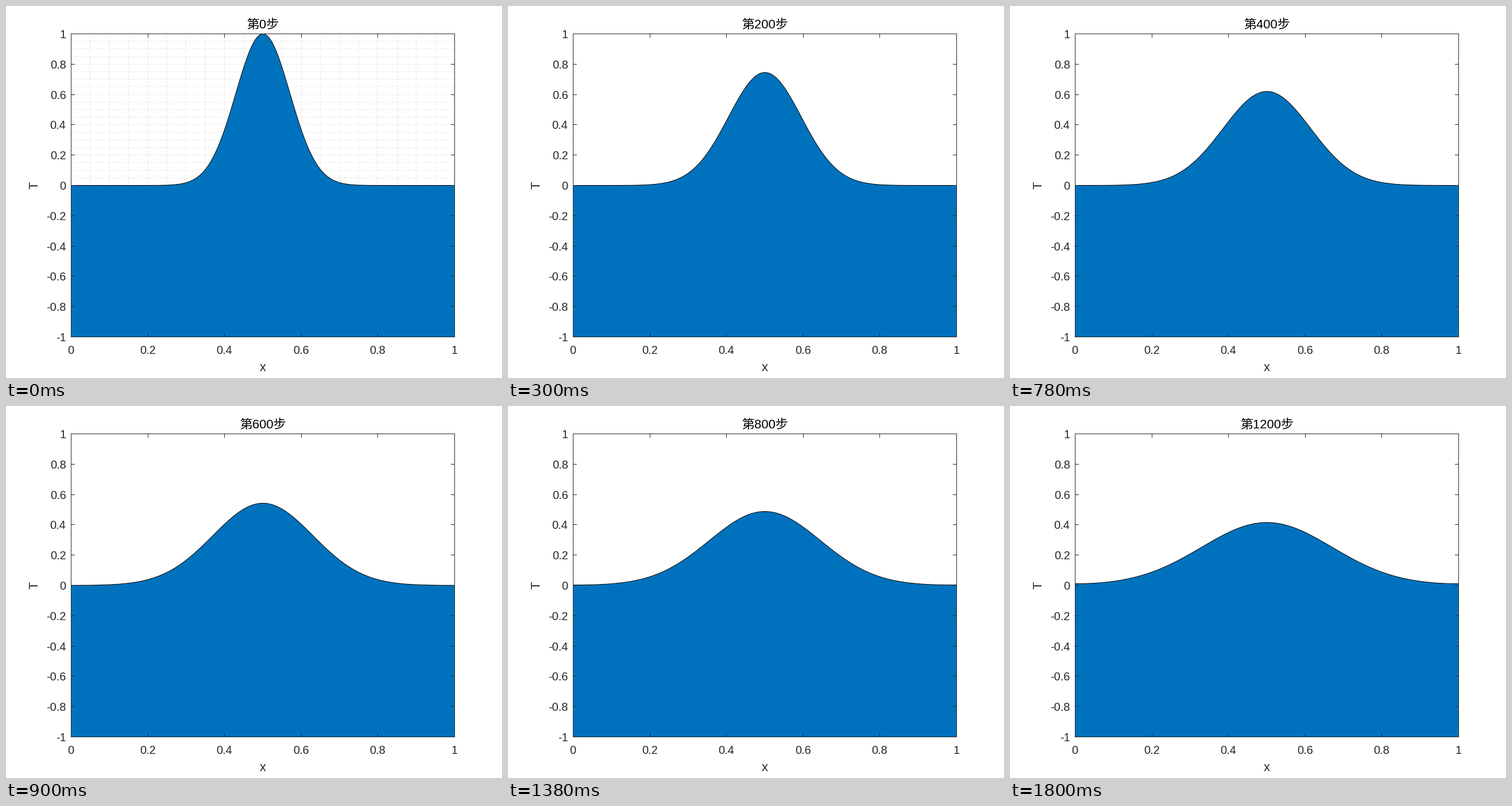
A matplotlib script for the animation above (2.1 s loop, 864 by 648 pixels).

```python
import numpy as np
import matplotlib.pyplot as plt
from matplotlib.animation import FuncAnimation

plt.rcParams["font.family"] = ["Liberation Sans", "Noto Sans CJK JP"]
plt.rcParams["toolbar"] = "None"

W, H = 864, 648
LEFT, RIGHT, TOP, BOTTOM = 113.5, 781.5, 48.5, 576.5
INK = (0.15, 0.15, 0.15)
BLUE = "#0072BD"
FRAMES, INTERVAL, STRIDE = 7, 300, 200

# One point equals one pixel at 72 dpi
fig = plt.figure(figsize=(W / 72, H / 72), dpi=72, facecolor="white")
ax = fig.add_axes([0, 0, 1, 1])
ax.set(xlim=(0, W), ylim=(H, 0))
ax.axis("off")


def px(x):
    return LEFT + (RIGHT - LEFT) * x


def py(y):
    return BOTTOM + (TOP - BOTTOM) * (y + 1) / 2


def centre(v):
    """Centre of the pixel that holds v."""
    return np.floor(v) + 0.5


def line(xs, ys, color=INK, z=5, **kw):
    return ax.plot(xs, ys, color=color, lw=1, zorder=z, snap=False, **kw)[0]


def label(x, y, s, size, ha="center", **kw):
    return ax.text(x, y, s, fontsize=size, color=kw.pop("color", INK),
                   ha=ha, va="baseline", zorder=6, **kw)


def heat(x, step):
    """Spreading Gaussian on [0, 1] with insulated ends (mirror images)."""
    spread = 1 + 0.004 * step
    return sum(np.exp(-100 * (x - c) ** 2 / spread)
               for c in (-0.5, 0.5, 1.5)) / np.sqrt(spread)


# Dotted minor grid
dots = dict(color=(0.1, 0.1, 0.1, 0.25), z=1, ls=(0, (1, 3)),
            dash_capstyle="butt")
grid = [line([centre(px(k / 20))] * 2, [48, 576], **dots)
        for k in range(1, 20)]
grid += [line([113, 781], [centre(py(k / 20))] * 2, **dots)
         for k in range(1, 20)]

# Frame, ticks and numbers
line([LEFT, RIGHT, RIGHT, LEFT, LEFT], [TOP, TOP, BOTTOM, BOTTOM, TOP],
     solid_joinstyle="miter", solid_capstyle="projecting")
TICK = 6.5
for k in range(6):
    x = centre(px(k / 5))
    line([x, x], [TOP, TOP + TICK], solid_capstyle="butt")
    line([x, x], [BOTTOM, BOTTOM - TICK], solid_capstyle="butt")
    label(x - 0.5, 606, f"{k / 5:g}", 20)
for k in range(-5, 6):
    y = centre(py(k / 5))
    line([LEFT, LEFT + TICK], [y, y], solid_capstyle="butt")
    line([RIGHT, RIGHT - TICK], [y, y], solid_capstyle="butt")
    label(104.5, y + 7.5, f"{k / 5:g}", 20, ha="right")

label(447.5, 636, "x", 22)
label(56, 312.5, "T", 22, rotation=90, rotation_mode="anchor")
title = label(447.5, 39, "", 22, color="black")

# Filled temperature profile
xs = np.linspace(0, 1, 201)
area, = ax.fill([LEFT, RIGHT, RIGHT], [BOTTOM, BOTTOM, TOP],
                fc=BLUE, ec="black", lw=1, zorder=3, snap=False)


def update(i):
    step = i * STRIDE
    curve = np.column_stack([px(xs), py(heat(xs, step))])
    area.set_xy(np.vstack([[LEFT, BOTTOM], curve, [RIGHT, BOTTOM]]))
    title.set_text(f"第{step}步")
    for g in grid:
        g.set_visible(i == 0)
    return [area, title, *grid]


anim = FuncAnimation(fig, update, frames=FRAMES, interval=INTERVAL,
                     repeat=True, repeat_delay=0, blit=False)
plt.show()
```
